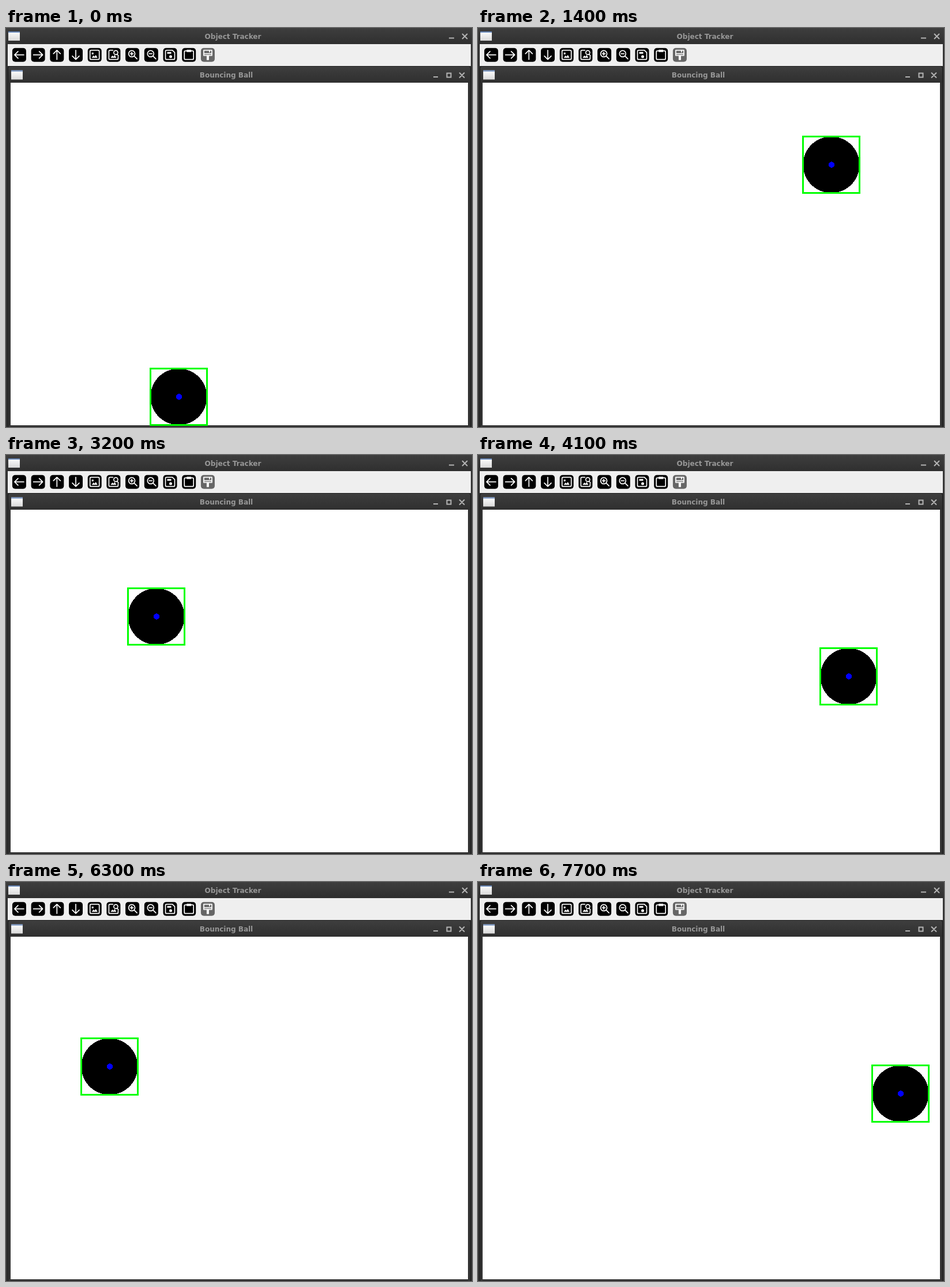
An HTML page that plays this animation: 808 by 693 pixels, repeating every 7800 ms.

```html
<!DOCTYPE html>
<html lang="en">
<head>
<meta charset="utf-8">
<title>Object Tracker</title>
<style>
  html, body { margin: 0; width: 100%; height: 100%; overflow: hidden; background: #2f2f2f; }
  svg { display: block; }
  text { font: bold 12px "DejaVu Sans", sans-serif; fill: #979797; text-anchor: middle; }
  .crisp { shape-rendering: crispEdges; }
  .control { fill: none; stroke: #b4b4b4; stroke-width: 2; }
  .glyph { fill: none; stroke: #fff; stroke-width: 1.7; stroke-linecap: round; stroke-linejoin: round; }
  .solid { fill: #fff; stroke: none; }
</style>
</head>
<body>
<svg width="808" height="693" viewBox="0 0 808 693">
  <defs>
    <linearGradient id="bar" x2="0" y2="1">
      <stop stop-color="#3e3e3e"/><stop offset="1" stop-color="#2f2f2f"/>
    </linearGradient>
    <linearGradient id="page" x2="0" y2="1">
      <stop stop-color="#fff"/><stop offset="1" stop-color="#d9d9d9"/>
    </linearGradient>
    <clipPath id="view"><rect x="8" y="95" width="793" height="596"/></clipPath>
    <g id="app">
      <rect width="20" height="16" fill="url(#page)"/>
      <rect width="20" height="2" fill="#6a8abc"/>
    </g>
  </defs>

  <rect width="808" height="693" fill="#2f2f2f"/>
  <rect width="808" height="28" fill="url(#bar)"/>
  <use href="#app" x="4" y="6"/>
  <text x="393.5" y="19">Object Tracker</text>
  <path class="control" d="M768 17.5h9M791 10l9 9m0-9l-9 9"/>

  <rect class="crisp" x="3" y="28" width="803" height="38" fill="#efefef"/>
  <g id="tools"></g>

  <path d="M3 693V71q0-5 5-5H801q5 0 5 5V693z" fill="#1c1c1c"/>
  <path d="M4 693V71q0-4 4-4H801q4 0 4 4V693z" fill="#333"/>
  <path d="M4 95V71q0-4 4-4H801q4 0 4 4V95z" fill="url(#bar)"/>
  <use href="#app" x="9" y="73.5"/>
  <text x="382" y="86">Bouncing Ball</text>
  <path class="control" d="M741 85h8M764.5 78.5h7v7h-7zM786 77.5l9 9m0-9l-9 9"/>

  <g clip-path="url(#view)">
    <rect x="8" y="95" width="793" height="595" fill="#fff"/>
    <g id="ball" class="crisp">
      <circle cx="50.5" cy="50.5" r="49"/>
      <rect x="1.5" y="1.5" width="98" height="98" fill="none" stroke="#0f0" stroke-width="3" stroke-linejoin="round"/>
      <circle cx="51" cy="50.5" r="5.2" fill="#00f"/>
    </g>
  </g>
</svg>
<script>
const STEP = 100, LOOP = 7800, SPEED = 42.45;

// Top left corner of the tracking box; the bounds are where it turns back.
const motionX = { from: 248.6, dir: 1, min: 4, max: 702.5 };
const motionY = { from: 589.8, dir: -1, min: 91.2, max: 590.5 };

function bounce({ from, dir, min, max }, step) {
  const span = max - min;
  const travel = from - min + dir * SPEED * step;
  const phase = ((travel % (2 * span)) + 2 * span) % (2 * span);
  return Math.round(min + span - Math.abs(phase - span));
}

// Toolbar glyphs, drawn around the button centre.
const path = (d, kind = '') => `<path class="${kind}" d="${d}"/>`;
const box = (x, y, w, h, kind = '', r = 0) =>
  `<rect class="${kind}" x="${x}" y="${y}" width="${w}" height="${h}" rx="${r}"/>`;
const ring = (x, y, r, kind = '') => `<circle class="${kind}" cx="${x}" cy="${y}" r="${r}"/>`;
const arrow = angle => `<g transform="rotate(${angle})">${path('M8 0H-7.5M-2-6L-8 0L-2 6')}</g>`;
const hills = path('M-5 5L-2 1L0 3L2 0L5 5z', 'solid');
const lens = ring(-1, -2, 5.5) + path('M3 2L8 7M-3.5-2h5');

const glyphs = [
  ...[0, 180, 90, -90].map(arrow),
  box(-8, -8, 16, 16, '', 2) + hills + box(-5, -4, 3, 3, 'solid'),
  path('M-1-8H-6Q-8-8-8-6V6Q-8 8-6 8H6Q8 8 8 6V3M6-1L8.5 1.5') + ring(4, -4, 3.5) + hills,
  lens + path('M-1-4.5v5'),
  lens,
  path('M-6-8H4L8-4V6Q8 8 6 8H-6Q-8 8-8 6V-6Q-8-8-6-8z') + box(-5, -5, 7, 3, 'solid') + ring(1, 3, 2.5, 'solid'),
  box(-8, -7, 16, 15, '', 2) + box(-4, -9, 8, 4, 'solid'),
  box(-7, -8, 14, 9) + path('M-7-2H7M3-8v3') + box(-2, 1, 4, 8, 'solid')
];
document.getElementById('tools').innerHTML = glyphs.map((glyph, i) => `
  <g transform="translate(${22.9 + i * 32.7} 46.7)">
    ${`<rect x="-12" y="-12" width="24" height="24" rx="5" fill="${i < 10 ? '#000' : '#666'}"/>`}
    <g class="glyph">${glyph}</g>
  </g>`).join('');

const ball = document.getElementById('ball');
const start = performance.now();

function draw(time) {
  const step = Math.floor((time % LOOP) / STEP);
  ball.setAttribute('transform', `translate(${bounce(motionX, step)} ${bounce(motionY, step)})`);
}

function tick() {
  draw(performance.now() - start);
  requestAnimationFrame(tick);
}
tick();
</script>
</body>
</html>
```
